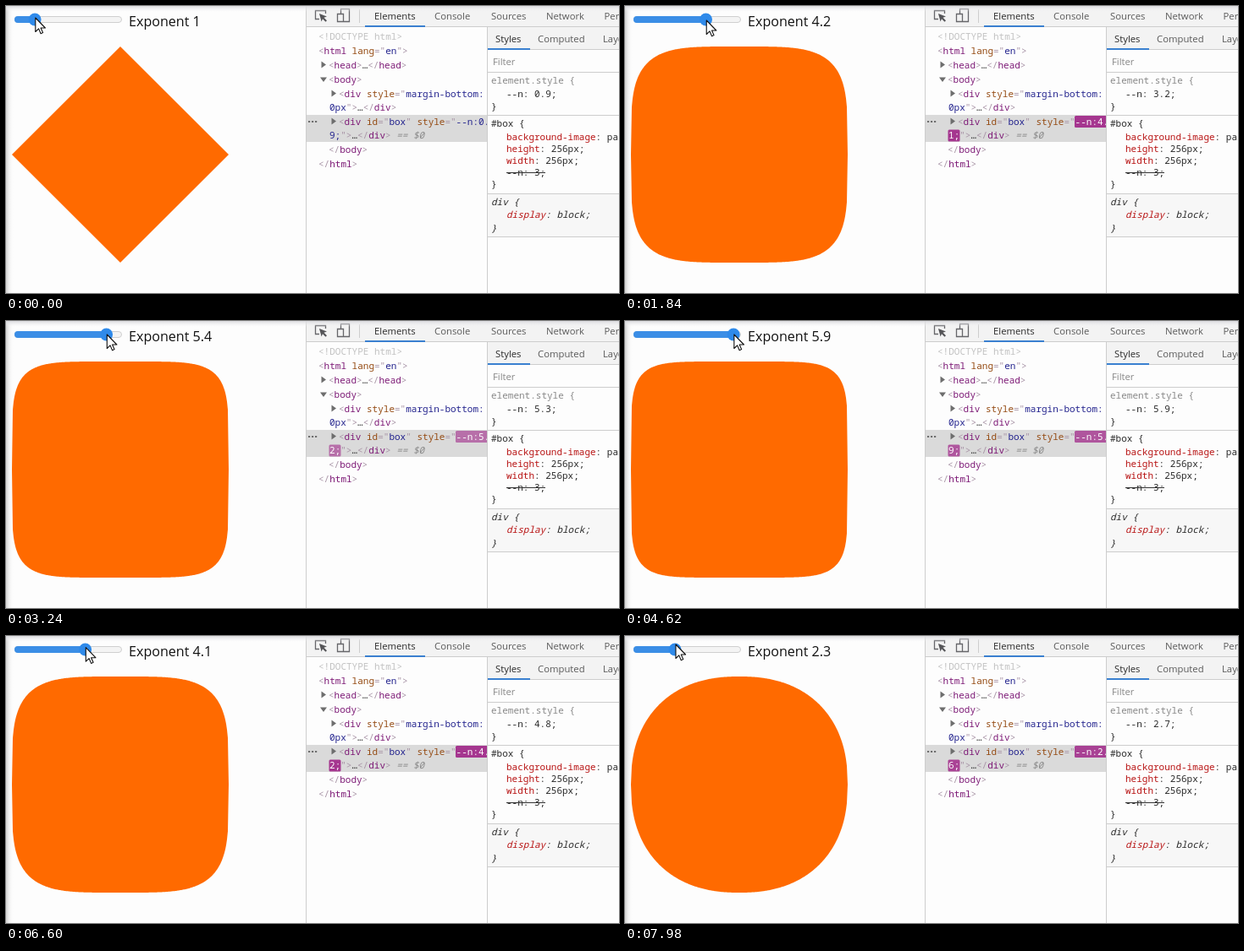
An HTML page that plays this animation: 724 by 340 pixels, repeating every 8 s.

```html
<!DOCTYPE html>
<html lang="en">
<head>
<meta charset="utf-8">
<title>Superellipse exponent</title>
<style>
  html, body { margin: 0; width: 100%; height: 100%; overflow: hidden; background: #fdfdfd; }
  svg { display: block; width: 724px; height: 340px; }
  text { white-space: pre; }
  .ui { font: 11.3px "Open Sans", "Noto Sans", sans-serif; }
  .code { font: 11px "Noto Sans Mono", "DejaVu Sans Mono", monospace; }
  .it { font-style: italic; }
  .rule { stroke: #cdcdcd; fill: none; }
  .icon { stroke: #66666a; stroke-width: 1.3; fill: none; }
</style>
</head>
<body>
<svg viewBox="0 0 724 340" xmlns="http://www.w3.org/2000/svg">
  <defs>
    <linearGradient id="edge"><stop stop-color="#d4d4d4"/><stop offset=".4" stop-color="#f0f0f0"/><stop offset="1" stop-color="#fdfdfd" stop-opacity="0"/></linearGradient>
    <linearGradient id="top" x2="0" y2="1"><stop stop-color="#dadade"/><stop offset="1" stop-color="#f3f3f5" stop-opacity="0"/></linearGradient>
    <clipPath id="tree"><rect x="355" y="25" width="213" height="315"/></clipPath>
  </defs>
  <rect width="724" height="340" fill="#fdfdfd"/>
  <rect width="9" height="340" fill="url(#edge)"/>

  <path id="shape" fill="#ff6a00"/>
  <rect x="10.5" y="12.5" width="126" height="7" rx="3.5" fill="#f4f4f4" stroke="#cfcfcf"/>
  <rect id="fill" x="10" y="12" height="8" rx="4" fill="#3b8ee6"/>
  <circle id="thumb" cy="16" r="7.5" fill="#2f8aea"/>
  <text id="label" x="145" y="24" style="font:16.1px 'Open Sans','Noto Sans',sans-serif" fill="#111"/>

  <rect x="355" width="369" height="25" fill="#f3f3f3"/>
  <rect x="569" y="25" width="155" height="27" fill="#f3f3f3"/>
  <rect x="569" y="223" width="155" height="50" fill="#f7f7f7"/>
  <rect x="355" y="129" width="213" height="32" fill="#dadada"/>
  <path class="rule" d="M354.5 0V340M355 24.5H724M568.5 25V340M417.5 4V20M569 51.5H724M569 78.5H724M569 129.5H724M569 222.5H724M569 273.5H724"/>
  <path d="M424 24H495M569 51H619" stroke="#3a80d0" stroke-width="2"/>
  <path class="icon" d="M370 15.5H365.5V5.5H377.5V9M395.5 9V3.5H405.5V18.5H399M391.5 9.5H398.5V18.5H391.5Z"/>
  <path d="M370 9L379 12.5 375.5 13.8 379 17.3 377.5 18.8 374 15.2 372.6 18.5Z" fill="#555558"/>
  <g fill="#6e6e6e">
    <path d="M372.5 65.5L378 69.5 372.5 73.5ZM371 84.5H379L375 90ZM384.5 99.5L390 103.5 384.5 107.5ZM384.5 132.5L390 136.5 384.5 140.5Z"/>
    <path d="M357 136h2.2v2h-2.2zM361 136h2.2v2h-2.2zM365 136h2.2v2h-2.2z"/>
  </g>
  <g clip-path="url(#tree)">
    <g id="flash" fill="#a5368f">
      <rect x="531" y="130" width="40" height="14" rx="1.5"/>
      <rect id="flash2" x="381.5" y="146.5" width="14" height="14" rx="1.5"/>
    </g>
    <g id="dom"></g>
  </g>
  <g id="panel"></g>
  <rect width="724" height="7" fill="url(#top)"/>
  <path id="cursor" d="M0 0V16.5L3.8 12.9 6.3 18.7 8.8 17.6 6.3 12H11.6Z" fill="#fff" stroke="#111" stroke-width="1.1" stroke-linejoin="round"/>
</svg>
<script>
const $ = id => document.getElementById(id);
const INK = { g: '#a894a6', t: '#7d1a76', a: '#944a12', v: '#24248e', k: '#2a2a2a', d: '#888', p: '#b81414', l: '#c2c2c2', u: '#5a5a5a', w: '#fff' };

// A run is an ink letter, a colon, then the words.
const spans = runs => runs.map(r =>
  `<tspan fill="${INK[r[0]]}">${r.slice(2).replace(/&/g, '&amp;').replace(/</g, '&lt;')}</tspan>`).join('');
function line(host, x, y, runs, cls = 'code', id = '') {
  $(host).insertAdjacentHTML('beforeend', `<text class="${cls}" x="${x}" y="${y}" id="${id}">${spans(runs)}</text>`);
}
const tag = (name, end = '') => ['g:<' + end, 't:' + name, 'g:>'];
const closeDiv = ['k:…', ...tag('div', '/')];

line('dom', 369, 40, ['l:<!DOCTYPE html>']);
line('dom', 369, 57, ['g:<', 't:html ', 'a:lang', 'g:="', 'v:en', 'g:">']);
line('dom', 381, 74, [...tag('head'), 'k:…', ...tag('head', '/')]);
line('dom', 381, 91, tag('body'));
line('dom', 393, 108, ['g:<', 't:div ', 'a:style', 'g:="', 'v:margin-bottom:']);
line('dom', 382, 124, ['v:0px', 'g:">', ...closeDiv]);
line('dom', 393, 141, ['g:<', 't:div ', 'a:id', 'g:="', 'v:box', 'g:" ', 'a:style', 'g:="']);
line('dom', 531.6, 141, [], 'code', 'attr1');
line('dom', 382, 157, [], 'code', 'attr2');
line('dom', 0, 157, ['d:== $0'], 'code it', 'ref');
line('dom', 381, 174, tag('body', '/'));
line('dom', 369, 191, tag('html', '/'));

const tabs = [['Elements', 435, 16], ['Console', 506, 16], ['Sources', 573, 16], ['Network', 638, 16], ['Performance', 706.5, 16],
  ['Styles', 578, 43], ['Computed', 628, 43], ['Layout', 705, 43]];
for (const [name, x, y] of tabs) {
  line('panel', x, y, [(name === 'Elements' || name === 'Styles' ? 'k:' : 'u:') + name], 'ui');
}
line('panel', 575, 70, ['d:Filter'], 'ui');
line('panel', 573, 92, ['d:element.style {']);
line('panel', 591, 108, [], 'code', 'styleN');
line('panel', 573, 123, ['k:}']);
line('panel', 573, 143, ['k:#box {']);
line('panel', 591, 159, ['p:background-image', 'k:: paint(box);']);
line('panel', 591, 173, ['p:height', 'k:: 256px;']);
line('panel', 591, 187, ['p:width', 'k:: 256px;']);
line('panel', 591, 201, ['k:--n: 3;']);
line('panel', 573, 215, ['k:}']);
line('panel', 573, 236, ['k:div {'], 'code it');
line('panel', 591, 251, ['p:display', 'k:: block;'], 'code it');
line('panel', 573, 267, ['k:}'], 'code it');
$('panel').insertAdjacentHTML('beforeend', '<path d="M591 197.5H637" stroke="#333"/>');

const LOOP = 8000;
const KEYS = [0, 23, 40, 70, 98, 128, 157, 172];
const TRACK = {
  slider: [1, 2.4, 4.2, 5.4, 5.9, 5.1, 2.9, 2.27],
  attr: [0.9, 2.4, 4.1, 5.2, 5.9, 5.2, 3, 2.58],
  style: [0.9, 1.8, 3.2, 5.3, 5.9, 5.4, 3.1, 2.55],
  cursorY: [14, 17, 17, 16, 16, 17, 10, 10],
  glow: [1, 1, 1, 0.65, 0.8, 1, 1, 0.92]
};

// Monotone cubic through the keys; hold > 1 makes it update less often.
function sample(v, tick, hold = 1) {
  let k = 0;
  while (k < KEYS.length - 2 && tick >= KEYS[k + 1]) k++;
  const rate = j => j < 0 || j > KEYS.length - 2 ? null : (v[j + 1] - v[j]) / (KEYS[j + 1] - KEYS[j]);
  const slope = j => {
    const a = rate(j - 1), b = rate(j);
    if (a === null || b === null) return a === null ? b : a;
    return a * b <= 0 ? 0 : 2 * a * b / (a + b);
  };
  const w = KEYS[k + 1] - KEYS[k];
  const s = Math.floor((tick - KEYS[k]) / hold) * hold / w, q = 1 - s;
  return q * q * (1 + 2 * s) * v[k] + s * s * (3 - 2 * s) * v[k + 1]
    + w * s * q * (q * slope(k) - s * slope(k + 1));
}
const tenth = x => Math.round(x * 10) / 10;

// Sampled at whole pixels in x, so the steep sides are straight chords.
function superellipse(n) {
  const R = 128, points = [];
  const add = (x, side) => {
    const y = R * (1 - Math.abs(x / R) ** n) ** (1 / n);
    points.push((135 + x) + ' ' + (176 + side * y).toFixed(2));
  };
  for (let x = -R; x <= R; x++) add(x, -1);
  for (let x = R; x >= -R; x--) add(x, 1);
  return 'M' + points.join('L') + 'Z';
}

// Three picture updates every 140 ms, at 0, 20 and 120.
function tickAt(t) {
  const p = t % 140;
  return 3 * Math.floor(t / 140) + (p < 20 ? 0 : p < 120 ? 1 : 2);
}

function draw(t) {
  const step = tickAt(t), tick = step < 2 ? 0 : step;
  const raw = sample(TRACK.slider, tick), n = tenth(raw);
  const x = 14.9 + 19.2 * n;
  $('shape').setAttribute('d', superellipse(n));
  $('fill').setAttribute('width', x - 10);
  $('thumb').setAttribute('cx', x);
  $('label').textContent = 'Exponent ' + n;
  $('cursor').setAttribute('transform', `translate(${15.6 + 19.2 * raw} ${sample(TRACK.cursorY, tick)})`);

  const attr = '--n:' + tenth(sample(TRACK.attr, tick, 2)) + ';';
  const rest = attr.slice(6), ink = tick ? 'w:' : 'v:';
  $('attr1').innerHTML = spans([ink + attr.slice(0, 6)]);
  $('attr2').innerHTML = spans([ink + rest, 'g:">', ...closeDiv]);
  $('ref').setAttribute('x', 382 + 6.6 * (rest.length + 10));
  $('flash').setAttribute('opacity', tick ? sample(TRACK.glow, tick) : 0);
  $('flash2').setAttribute('width', rest.length * 7);
  $('styleN').innerHTML = spans(['k:--n: ' + tenth(sample(TRACK.style, tick, 5)) + ';']);
}

const start = performance.now();
function loop() {
  draw((performance.now() - start) % LOOP);
  requestAnimationFrame(loop);
}
loop();
</script>
</body>
</html>
```
